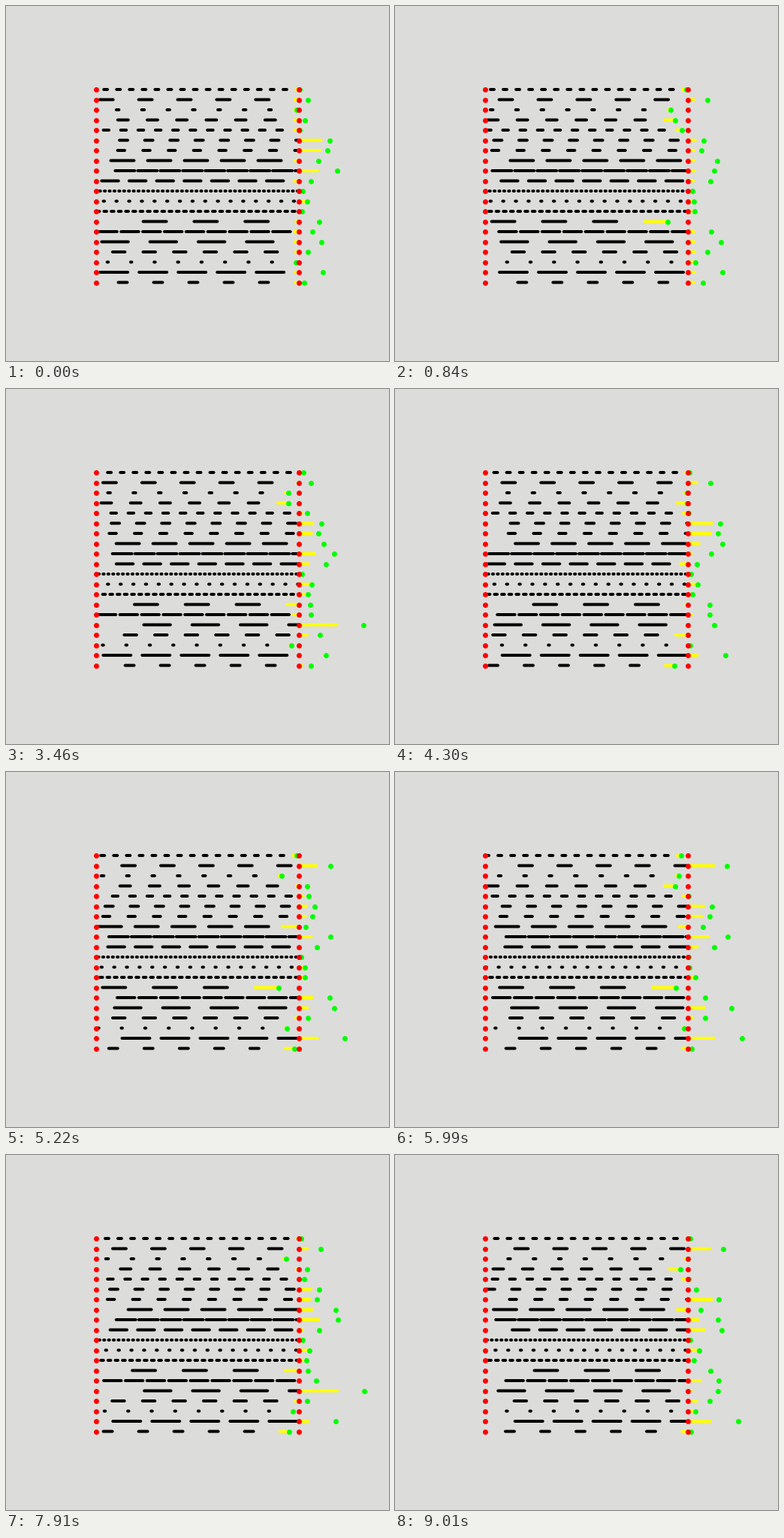
Write a matplotlib script that moves like this. It is 510x472 px and loops after 9040 ms.

```python
import numpy as np
import matplotlib.pyplot as plt
from matplotlib.animation import FuncAnimation
from matplotlib.collections import LineCollection

W, H, DPI = 510, 472, 64  # a power of two keeps the pixel size exact
PX = 72 / DPI
LOOP, INTERVAL = 9040, 20
LEFT, RIGHT = 120.0, 390.0
TOP, ROW_GAP = 111.0, 13.5
STEP = 0.409  # pixels moved per tick

# period, dash length, starting phase
ROWS = [
    (17.05, 5.0, 10.2), (51.9, 18.0, 4.7), (33.8, 3.5, 26.9), (39.2, 14.0, 28.8),
    (23.1, 7.5, 9.6), (33.55, 11.0, 31.1), (33.7, 9.5, 28.6), (49.0, 31.0, 19.5),
    (29.95, 26.0, 25.45), (36.6, 22.5, 7.3), (6.42, 1.2, 4.6), (16.87, 1.5, 9.6),
    (9.64, 3.6, 0.8), (67.8, 31.0, 62.6), (28.85, 23.5, 4.35), (64.3, 35.5, 7.3),
    (40.6, 16.5, 21.9), (31.25, 1.5, 14.7), (52.0, 37.0, 5.2), (47.0, 12.0, 29.5),
]

# the tick rate wavers: (start ms, end ms, ticks)
BURSTS = [
    (20, 920, 37), (940, 1840, 36), (1870, 2760, 36), (2780, 3680, 37),
    (3700, 4590, 35), (4630, 5510, 26), (5540, 6430, 36), (6450, 7330, 33),
    (7370, 8260, 33), (8290, 9010, 30),
]
times, ticks = [0], [0]
for start, end, count in BURSTS:
    times += [start, end]
    ticks += [ticks[-1] + 1, ticks[-1] + count]

ys = TOP + ROW_GAP * np.arange(len(ROWS))

fig = plt.figure(figsize=(W / DPI, H / DPI), dpi=DPI, facecolor="#dcdcda")
ax = fig.add_axes([0, 0, 1, 1])
ax.set_xlim(0, W)
ax.set_ylim(H, 0)
ax.axis("off")


def make_lines(color, z):
    lines = LineCollection([], colors=color, linewidths=4 * PX,
                           capstyle="round", zorder=z)
    lines.set_snap(False)
    return ax.add_collection(lines, autolim=False)


def make_dots(xs, ys, color, z):
    dots = ax.scatter(xs, ys, s=(7 * PX) ** 2, c=color, linewidths=0, zorder=z)
    dots.set_snap(False)
    return dots


dashes = make_lines("#000000", 1)
tails = make_lines("#ffff00", 2)
heads = make_dots(np.full(len(ys), RIGHT), ys, "#00ff00", 3)
make_dots(np.repeat([LEFT, RIGHT], len(ys)), np.tile(ys, 2), "#ff0000", 4)


def update(i):
    shift = STEP * np.interp(i * INTERVAL, times, ticks)
    black, yellow, green = [], [], []
    for y, (period, length, phase) in zip(ys, ROWS):
        n = int(np.ceil((RIGHT - LEFT) / period))
        starts = LEFT + (phase + shift) % period + period * np.arange(n)
        segs = [[(x, y), (min(x + length, RIGHT), y)] for x in starts]
        black += segs[:-1]
        yellow.append(segs[-1])
        green.append((starts[-1] + length, y))
    dashes.set_segments(black)
    tails.set_segments(yellow)
    heads.set_offsets(green)
    return dashes, tails, heads


anim = FuncAnimation(fig, update, frames=LOOP // INTERVAL, interval=INTERVAL,
                     repeat=True, repeat_delay=0, blit=False)
plt.show()
```
